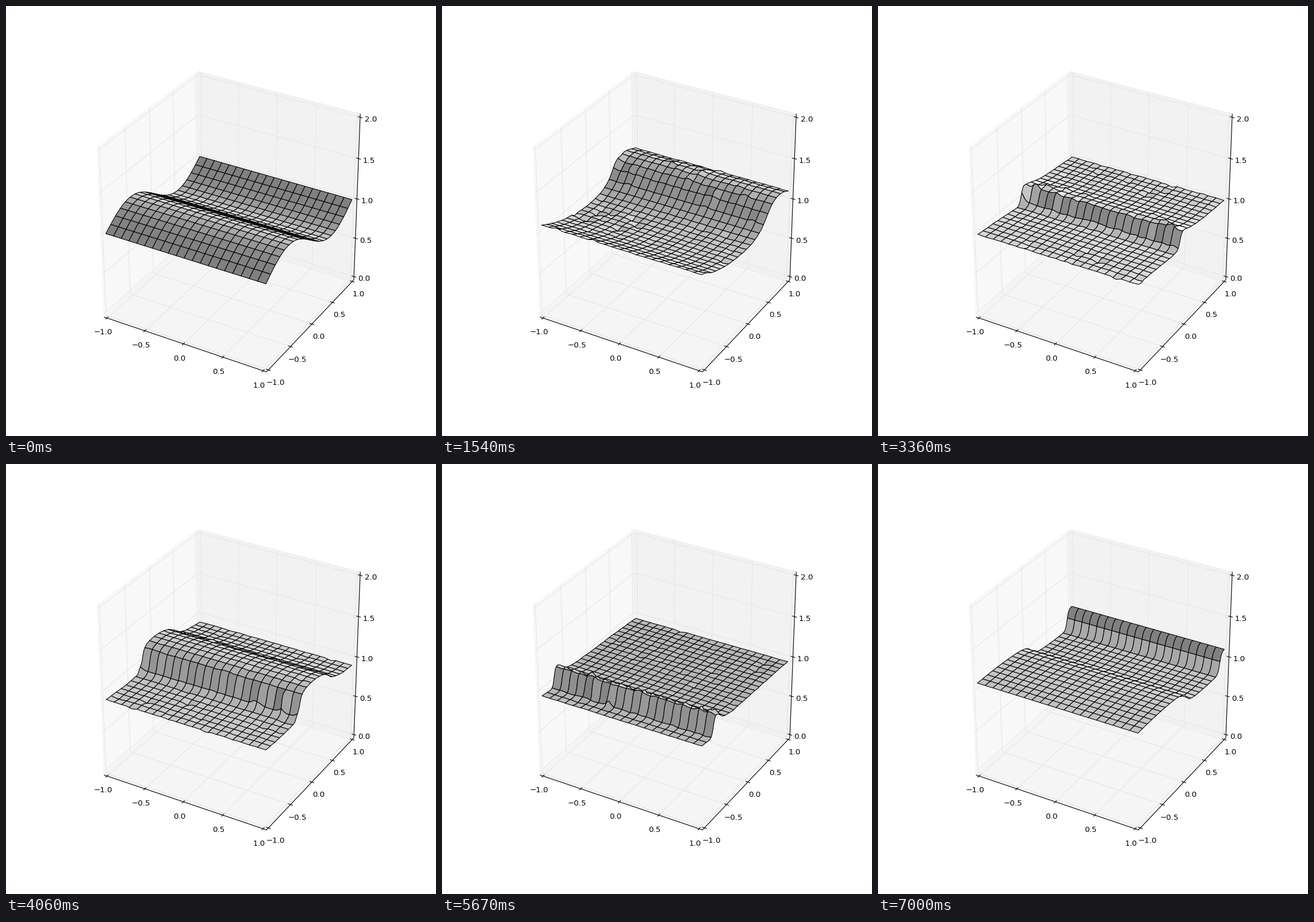
Write a matplotlib script that moves like this. It is 748 px wide and 748 px high and loops after 7.42 s.

```python
import numpy as np
import matplotlib.pyplot as plt
from matplotlib.animation import FuncAnimation
from matplotlib.collections import LineCollection, PolyCollection

SIZE, DPI = 748, 64
STEPS, HOLD = 100, 6          # moving frames, then the pause at the end
SUB = 8                       # solver steps per frame
T_END, MOMENTUM = 3.1, 0.315
N, STRIDE = 100, 5            # mesh intervals, intervals per facet
NODES = 31                    # patches of the local clocks
LINE = 1.25
PAD = 1 + 1 / 24              # half width of the padded box


# Shallow water on a periodic line, g = 1
def flux(q):
    return np.array([q[1], q[1] ** 2 / q[0] + q[0] ** 2 / 2])


def speed(q):
    return np.abs(q[1] / q[0]) + np.sqrt(q[0])


def rate(q, dx):
    back = q - np.roll(q, 1, axis=1)
    ahead = np.roll(back, -1, axis=1)
    slope = np.where(back * ahead > 0,
                     np.sign(back) * np.minimum(abs(back), abs(ahead)), 0)
    left = q + slope / 2
    right = np.roll(q - slope / 2, -1, axis=1)
    a = np.maximum(speed(left), speed(right))
    f = (flux(left) + flux(right) - a * (right - left)) / 2
    return (np.roll(f, 1, axis=1) - f) / dx


def solve():
    dx, dt = 2 / N, T_END / (STEPS * SUB)
    y = -1 + dx * np.arange(N)
    q = np.array([1 - 0.2 * np.sin(np.pi * y), np.full(N, MOMENTUM)])
    rows = [q[0]]
    for _ in range(STEPS * SUB):
        mid = q + dt * rate(q, dx)
        q = (q + mid + dt * rate(mid, dx)) / 2
        rows.append(q[0])
    h = np.array(rows)
    return np.hstack([h, h[:, :1]])


# Perspective view, azimuth -60, elevation 30, distance 10
AZ, EL = np.radians(-60), np.radians(30)
OUT = np.array([np.cos(AZ) * np.cos(EL), np.sin(AZ) * np.cos(EL), np.sin(EL)])
RIGHT = np.array([-np.sin(AZ), np.cos(AZ), 0])
UP = np.cross(OUT, RIGHT)


def project(p):
    """Points in a cube of -1..1 to pixels and depth."""
    c = np.asarray(p, float) / 2
    d = 10 - c @ OUT
    px = SIZE * (0.125 + 0.775 * (c @ RIGHT / d + 0.095) / 0.185)
    py = SIZE * (0.9 - 0.8 * (c @ UP / d + 0.095) / 0.185)
    return np.stack([px, py], axis=-1), d


def flat(points):
    return project(points)[0]


def draw_box(ax):
    lo, hi = -PAD, PAD
    panes = [
        ("0.95", [(lo, lo, lo), (lo, hi, lo), (lo, hi, hi), (lo, lo, hi)]),
        ("0.90", [(lo, hi, lo), (hi, hi, lo), (hi, hi, hi), (lo, hi, hi)]),
        ("0.925", [(lo, lo, lo), (hi, lo, lo), (hi, hi, lo), (lo, hi, lo)]),
    ]
    for tone, corners in panes:
        ax.add_patch(plt.Polygon(flat(corners), fc=tone, ec=tone, alpha=0.5,
                                 lw=LINE))

    ticks = np.linspace(-1, 1, 5)
    grid, marks = [], []
    t, k = 0.029, 0.0874      # tick reach and label distance
    for v in ticks:
        grid += [flat([(v, lo, lo), (v, hi, lo), (v, hi, hi)]),
                 flat([(hi, v, lo), (lo, v, lo), (lo, v, hi)]),
                 flat([(lo, lo, v), (lo, hi, v), (hi, hi, v)])]
        marks += [flat([(v, lo - t, lo), (v, lo + t, lo)]),
                  flat([(hi - t, v, lo), (hi + t, v, lo)]),
                  flat([(hi - t, hi, v), (hi + t, hi, v)])]
        labels = [((v, lo - k, lo - k), v),
                  ((hi + k, v, lo - k), v),
                  ((hi + k, hi + k, v), v + 1)]
        for spot, value in labels:
            x, y = flat(spot)
            text = f"{value:.1f}".replace("-", "\u2212")
            ax.text(x, y + 10.2, text, ha="center", va="baseline",
                    fontsize=15, family="DejaVu Sans")
    edges = [flat([(lo, lo, lo), (hi, lo, lo)]),
             flat([(hi, lo, lo), (hi, hi, lo)]),
             flat([(hi, hi, lo), (hi, hi, hi)])]
    ax.add_collection(LineCollection(grid, colors="0.9", lw=LINE, zorder=2))
    ax.add_collection(LineCollection(edges + marks, colors="k", lw=LINE,
                                     zorder=3))


def facet_rings():
    s = STRIDE
    ring = ([(0, j) for j in range(s + 1)]
            + [(i, s) for i in range(1, s + 1)]
            + [(s, j) for j in range(s, -1, -1)]
            + [(i, 0) for i in range(s - 1, -1, -1)])
    ring = np.array(ring)
    starts = np.arange(0, N, s)
    a, b = np.meshgrid(starts, starts, indexing="ij")
    return a.reshape(-1, 1) + ring[:, 0], b.reshape(-1, 1) + ring[:, 1]


HEIGHT = solve()
RI, RJ = facet_rings()
AXIS = np.linspace(-1, 1, N + 1)
X, Y = np.meshgrid(AXIS, AXIS, indexing="ij")
COLS = np.arange(N + 1)[None, :]
BLEND = np.maximum(0, 1 - abs(np.linspace(0, NODES - 1, N + 1)[:, None]
                              - np.arange(NODES)))


def surface(frame):
    """Height field where each patch runs a little ahead on its own clock."""
    clock = np.full((N + 1, N + 1), float(min(frame, STEPS)))
    if 0 < frame < STEPS:
        rng = np.random.default_rng(frame)
        lead = 1.5 + 0.25 * rng.standard_normal((NODES, NODES))
        lead += 2.2 * (rng.random((NODES, NODES)) < 0.05)
        clock += BLEND @ lead @ BLEND.T
    idx = np.clip(np.rint(clock * SUB).astype(int), 0, STEPS * SUB)
    return HEIGHT[idx, COLS]


def shade(p):
    a, b, c = (p[:, k] for k in (0, p.shape[1] // 3, 2 * p.shape[1] // 3))
    n = np.cross(a - b, b - c)
    s = n @ np.array([-1, -1, 0.5]) / np.linalg.norm(n, axis=1)
    return 0.5 + 0.5 * (s - s.min()) / (s.max() - s.min())


fig = plt.figure(figsize=(SIZE / DPI, SIZE / DPI), dpi=DPI, facecolor="w")
ax = fig.add_axes([0, 0, 1, 1])
ax.set(xlim=(0, SIZE), ylim=(SIZE, 0))
ax.axis("off")
draw_box(ax)
mesh = PolyCollection([], edgecolors="k", linewidths=LINE, zorder=4)
ax.add_collection(mesh, autolim=False)


def update(frame):
    z = surface(frame)
    p = np.stack([X, Y, z], axis=-1)[RI, RJ]
    grey = shade(p)
    xy, depth = project(p - [0, 0, 1])
    order = np.argsort(-depth.mean(axis=1))
    mesh.set_verts(xy[order])
    mesh.set_facecolor(np.repeat(grey[order, None], 3, axis=1))
    return (mesh,)


anim = FuncAnimation(fig, update, frames=STEPS + HOLD, interval=70,
                     init_func=lambda: update(0), repeat=True,
                     repeat_delay=0, blit=False)
plt.show()
```
